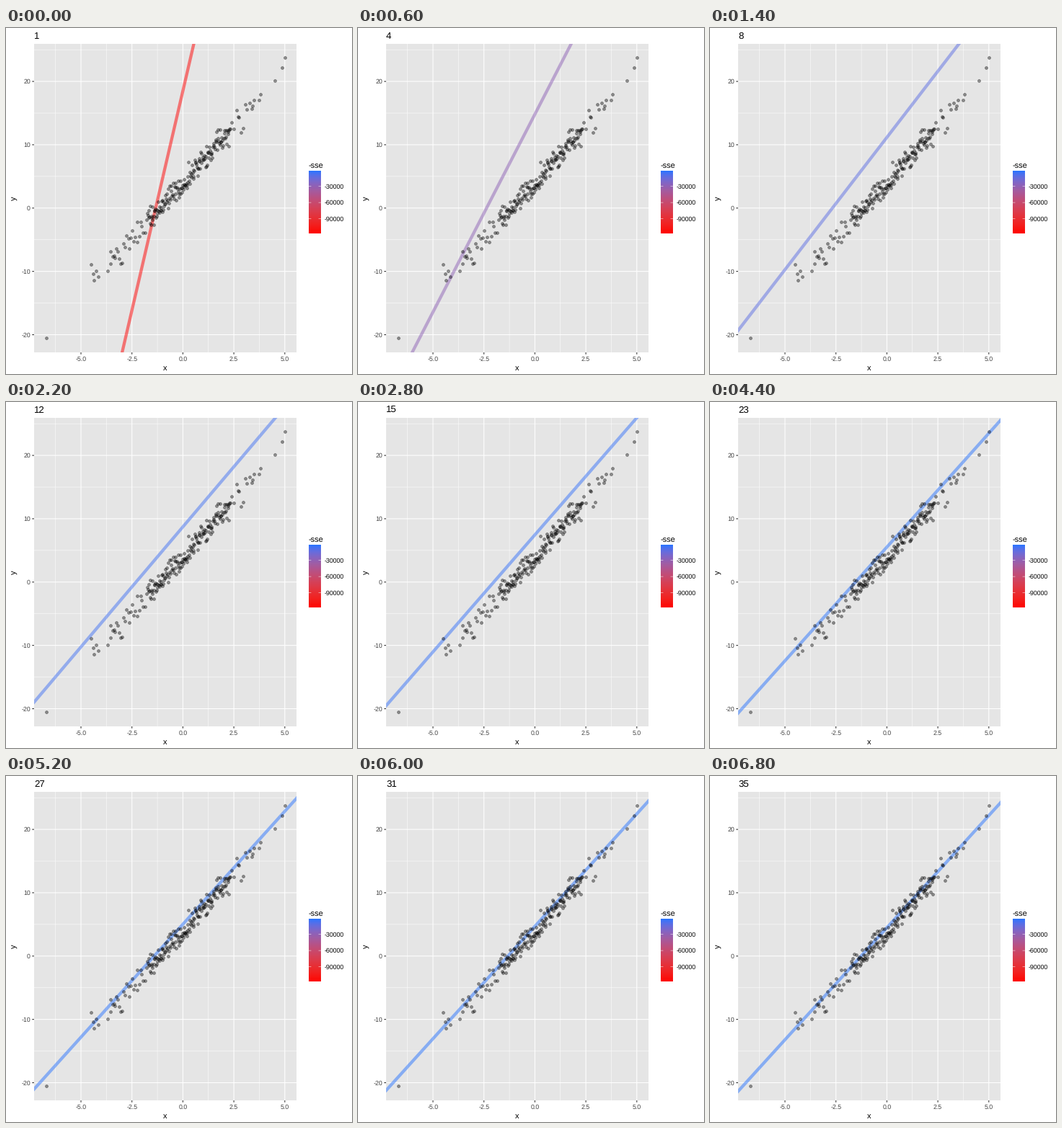
Write a matplotlib script that moves like this. It is 480x480 px and loops after 7000 ms.

```python
import numpy as np
import matplotlib.pyplot as plt
from matplotlib.animation import FuncAnimation
from matplotlib.patches import Rectangle

SIZE, DPI = 480, 72            # at 72 dpi one point is one pixel
STEPS, INTERVAL = 35, 200
LEFT, TOP, RIGHT, BOTTOM = 39, 22, 403, 450
X0, X_UNIT = 245.4, 28.28
Y0, Y_UNIT = 249.8, 8.785
PANEL, TICK, LABEL = "#e5e5e5", "#333333", "#444444"
LOW, HIGH = (255, 0, 0), (60, 138, 255)
GAMMA = 1.27                   # the ramp is shown slightly darkened
SLOPE, INTERCEPT = 3.52, 4.08  # where the fit settles

plt.rcParams["font.family"] = "Liberation Sans"
plt.rcParams["text.hinting"] = "no_hinting"

# Extremes of the cloud, in data units
EXTREMES = [(-6.71, -20.55), (-4.5, -8.95), (-4.41, -10.4), (-4.38, -11.4),
            (-4.25, -9.9), (-4.14, -10.8), (3.75, 17), (3.8, 18),
            (4.51, 20.1), (4.87, 22.15), (4.99, 23.8)]


def make_cloud(count=211):
    """Noise around the trend: sparse tails and an even, dense middle."""
    rng = np.random.default_rng(8)
    rank = np.arange(count) + rng.uniform(0, 1, count)
    x = np.interp(rank, [0, 28, 197, count], [-3.7, -1.75, 2.3, 3.55])
    noise = np.clip(rng.normal(0, 0.95, count), -2.2, 2.2)
    return np.vstack([np.column_stack([x, SLOPE * x + INTERCEPT + noise]), EXTREMES])


def to_px(x, y):
    return X0 + X_UNIT * x, Y0 - Y_UNIT * y


def fit(step):
    """Slope and intercept after some steps of gradient descent."""
    fast, slow = 0.611 ** step, 0.8995 ** step
    return SLOPE + 9.6 * fast + 0.74 * slow, INTERCEPT - 0.465 * fast + 14.9 * slow


# Colour ramp blended in Lab space
TO_XYZ = np.array([[0.4124, 0.3576, 0.1805],
                   [0.2126, 0.7152, 0.0722],
                   [0.0193, 0.1192, 0.9505]])
WHITE = TO_XYZ.sum(axis=1)
TO_LAB = np.array([[0, 116, 0], [500, -500, 0], [0, 200, -200]])


def rgb_to_lab(rgb):
    c = np.array(rgb) / 255
    lin = np.where(c > 0.04045, ((c + 0.055) / 1.055) ** 2.4, c / 12.92)
    t = TO_XYZ @ lin / WHITE
    f = np.where(t > 0.008856, np.cbrt(t), 7.787 * t + 16 / 116)
    return TO_LAB @ f


def lab_to_rgb(lab):
    f = np.linalg.solve(TO_LAB, lab)
    t = np.where(f > 0.2069, f ** 3, (f - 16 / 116) / 7.787)
    lin = np.clip(np.linalg.solve(TO_XYZ, t * WHITE), 0, 1)
    c = np.where(lin > 0.0031308, 1.055 * lin ** (1 / 2.4) - 0.055, 12.92 * lin)
    return np.clip(c, 0, 1)


LAB_LOW, LAB_HIGH = rgb_to_lab(LOW), rgb_to_lab(HIGH)


def ramp(t):
    return lab_to_rgb(LAB_LOW + t * (LAB_HIGH - LAB_LOW)) ** GAMMA


data_x, data_y = make_cloud().T
fits = [fit(k) for k in range(STEPS)]
errors = np.array([np.sum((m * data_x + b - data_y) ** 2) for m, b in fits])
scores = (errors.max() - errors) / (errors.max() - errors.min())

fig = plt.figure(figsize=(SIZE / DPI, SIZE / DPI), dpi=DPI, facecolor="white")
ax = fig.add_axes([0, 0, 1, 1])
ax.axis("off")


def stroke(x, y, color, width, z=1):
    return ax.plot(x, y, color=color, lw=width, zorder=z, snap=False,
                   solid_capstyle="butt")[0]


def label(x, y, text, size, color="black", **kw):
    kw.setdefault("va", "baseline")
    return ax.text(x, y, text, fontsize=size, color=color, **kw)


panel = Rectangle((LEFT, TOP), RIGHT - LEFT, BOTTOM - TOP, fc=PANEL, lw=0, zorder=0)
ax.add_patch(panel)

# Grid, ticks and axis labels
for x in np.arange(-6.25, 5, 2.5):
    stroke([to_px(x, 0)[0]] * 2, [TOP, BOTTOM], "white", 0.53)
for y in range(-15, 26, 10):
    stroke([LEFT, RIGHT], [to_px(0, y)[1]] * 2, "white", 0.53)
for x in np.arange(-5, 5.1, 2.5):
    gx = to_px(x, 0)[0]
    stroke([gx, gx], [TOP, BOTTOM], "white", 1.07)
    stroke([gx, gx], [BOTTOM, BOTTOM + 2.75], TICK, 1.07)
    label(gx, 461.6, f"{x:.1f}", 8.8, LABEL, ha="center")
for y in range(-20, 21, 10):
    gy = to_px(0, y)[1]
    stroke([LEFT, RIGHT], [gy, gy], "white", 1.07)
    stroke([LEFT - 2.75, LEFT], [gy, gy], TICK, 1.07)
    label(34, gy + 3.2, str(y), 8.8, LABEL, ha="right")

label(221, 475, "x", 11, ha="center")
label(11.5, 236, "y", 11, ha="center", va="center", rotation=90)
title = label(LEFT, 15, "", 13.2)

# Colour bar
label(420, 195, "-sse", 11)
bar = np.array([[ramp(t)] for t in np.linspace(1, 0, 120)])
ax.imshow(bar, extent=(420, 437, 285, 198.3), aspect="auto",
          interpolation="bilinear", zorder=1)
for i, value in enumerate((-30000, -60000, -90000)):
    y = 219.6 + 22.5 * i
    stroke([420, 423.4], [y, y], "white", 0.5, 2)
    stroke([433.6, 437], [y, y], "white", 0.5, 2)
    label(441.2, y + 3.2, str(value), 8.8)

line = stroke([], [], "red", 4.3, 3)
line.set_alpha(0.5)
line.set_clip_path(panel)
ax.scatter(*to_px(data_x, data_y), s=3.95 ** 2, facecolor=(0, 0, 0, 0.4),
           edgecolor=(0, 0, 0, 0.4), linewidth=0.71, zorder=4, snap=False)
ax.set_xlim(0, SIZE)
ax.set_ylim(SIZE, 0)

ENDS = np.array([-9.0, 8.0])


def update(step):
    slope, intercept = fits[step]
    line.set_data(*to_px(ENDS, slope * ENDS + intercept))
    line.set_color(ramp(scores[step]))
    title.set_text(str(step + 1))
    return line, title


anim = FuncAnimation(fig, update, frames=STEPS, interval=INTERVAL,
                     repeat=True, repeat_delay=0)
plt.show()
```
